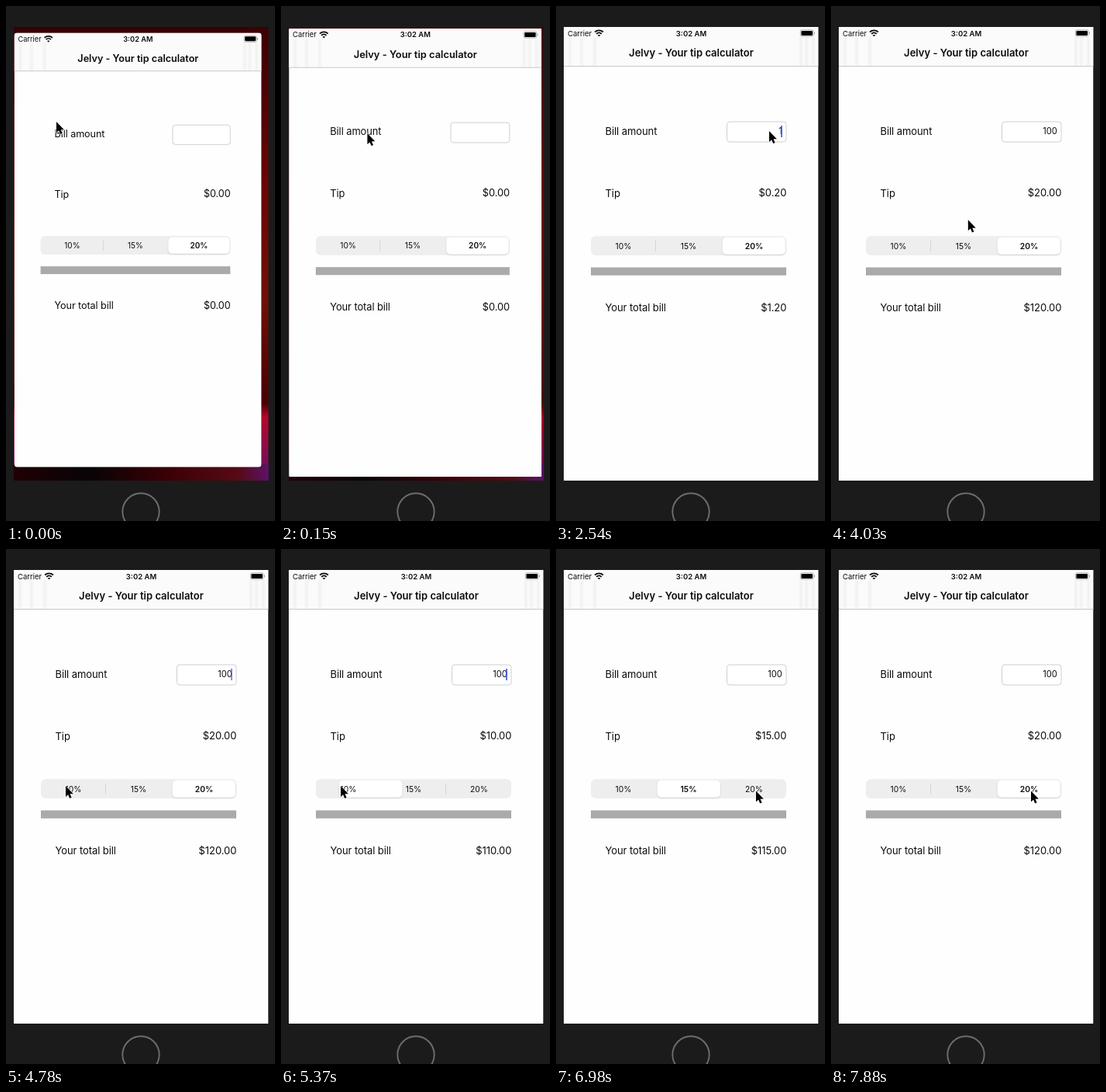
Animation of 347 by 663 pixels, one loop 8000 ms. Source, as an HTML page:

```html
<!DOCTYPE html>
<html lang="en">
<head>
<meta charset="utf-8">
<title>Tip calculator</title>
<style>
  html, body { margin: 0; width: 100%; height: 100%; overflow: hidden; background: #1b1b1b; }
  svg { display: block; width: 100vw; height: 100vh; }
  text { font: 13px Inter, "Liberation Sans", sans-serif; letter-spacing: -.08px; fill: #0c0c0c; }
  .title { font-weight: 600; letter-spacing: 0; }
  .status { font-size: 9.5px; letter-spacing: 0; }
  .seg text { font-size: 10.3px; letter-spacing: 0; text-anchor: middle; }
  .end { text-anchor: end; }
  .mid { text-anchor: middle; }
  #bill { font-size: 11.1px; letter-spacing: 0; }
</style>
</head>
<body>
<svg viewBox="0 0 347 663">
  <defs>
    <linearGradient id="side" x2="0" y2="1">
      <stop offset="0" stop-color="#3c0004"/>
      <stop offset=".35" stop-color="#6a0606"/>
      <stop offset=".6" stop-color="#6e1204"/>
      <stop offset=".83" stop-color="#4a0006"/>
      <stop offset=".86" stop-color="#b4082a"/>
      <stop offset="1" stop-color="#5c1266"/>
    </linearGradient>
    <linearGradient id="floor">
      <stop offset="0" stop-color="#200004"/>
      <stop offset=".3" stop-color="#080406"/>
      <stop offset=".6" stop-color="#3a0006"/>
      <stop offset=".88" stop-color="#560a14"/>
      <stop offset="1" stop-color="#5c1266"/>
    </linearGradient>
    <filter id="soft"><feGaussianBlur stdDeviation=".9"/></filter>
    <filter id="lift" x="-10%" y="-20%" width="120%" height="150%">
      <feDropShadow dx="0" dy="1" stdDeviation="1.2" flood-opacity=".16"/>
    </filter>
    <clipPath id="window"><rect id="mask" x="10" y="27" width="328.5"/></clipPath>
  </defs>

  <rect width="347" height="663" fill="#1b1b1b"/>
  <circle cx="174" cy="651" r="23.7" fill="none" stroke="#6c6c6c" stroke-width="2"/>

  <g id="home">
    <rect x="10" y="27" width="328.5" height="584" fill="url(#side)"/>
    <rect x="10" y="27" width="300" height="8" fill="#360004"/>
    <rect x="10" y="590" width="328.5" height="21" fill="url(#floor)"/>
  </g>

  <g id="app"><g clip-path="url(#window)">
    <rect x="10" y="27" width="328.5" height="584" fill="#fefefe"/>
    <rect x="10" y="27" width="328.5" height="50.5" fill="#fbfbfb"/>
    <path d="M18 40V77M33 40V77M50 40V77M316 40V77M323 40V77M332 40V77"
      stroke="#f2f2f2" stroke-width="4" filter="url(#soft)"/>
    <path d="M10 77.5H338.5" stroke="#c9c9c9"/>

    <text class="status" x="15" y="38.5">Carrier</text>
    <g fill="none" stroke="#0c0c0c" stroke-width="1.8">
      <path d="M50.1 33.5a7.8 7.8 0 0 1 10.8 0M52.2 35.8a4.7 4.7 0 0 1 6.6 0"/>
      <path d="M54.2 37.6h2.6l-1.3 1.4z" stroke-width=".8" fill="#0c0c0c"/>
    </g>
    <text class="status title mid" x="174.5" y="38.5">3:02 AM</text>
    <rect x="315.2" y="30.7" width="17" height="8.4" rx="2.2" fill="none" stroke="#999" stroke-width=".7"/>
    <rect x="316.4" y="31.9" width="14.6" height="6" rx="1.2"/>
    <path d="M333.3 33.6v2.6" stroke="#999"/>

    <text class="title mid" x="174.5" y="65">Jelvy - Your tip calculator</text>
    <text x="63.5" y="165.5">Bill amount</text>
    <rect x="220.5" y="149" width="76.5" height="26" rx="3.5" fill="#fff" stroke="#cecece"/>
    <text id="bill" class="end" x="291.7" y="165.2"></text>
    <rect id="caret" x="290.2" y="154" width="1.6" height="15" fill="#3450f0"/>

    <text x="63.5" y="245.5">Tip</text>
    <text id="tip" class="end" x="297.3" y="245"></text>

    <g class="seg">
      <rect x="45" y="296.3" width="252" height="24.7" rx="6" fill="#eeeeef"/>
      <path class="bar" d="M128.5 302v14" stroke="#d4d4d6"/>
      <path class="bar" d="M212.5 302v14" stroke="#d4d4d6"/>
      <rect id="thumb" y="297.7" width="81" height="22" rx="5" fill="#fff" filter="url(#lift)"/>
      <text x="87" y="312.6">10%</text>
      <text x="171" y="312.6">15%</text>
      <text x="255.5" y="312.6">20%</text>
    </g>
    <rect x="45" y="336.5" width="252" height="10.3" fill="#aaa"/>

    <text x="63.5" y="393.3">Your total bill</text>
    <text id="total" class="end" x="297.3" y="393.3"></text>
  </g></g>

  <path id="cursor" d="M0 0v14l3.1-2.8 2.1 4.9 2.4-1-2.1-4.8h4.4z"
    stroke="#fff" stroke-width="1.1" paint-order="stroke"/>
</svg>

<script>
const LOOP = 8000, TICK = 148.5;   // the screen refreshes once per tick
const $ = id => document.getElementById(id);
const bars = document.querySelectorAll('.bar');
const labels = document.querySelectorAll('.seg text');

const moves = [
  { from: 0, to: 750, x: 251, y: 180 },
  { from: 750, to: 1180, x: 275, y: 161 },
  { from: 3600, to: 4600, x: 77, y: 305 },
  { from: 5500, to: 6230, x: 165, y: 311 },
  { from: 6540, to: 6980, x: 258, y: 311.5 }
];
const keys = [2520, 2960, 3110];          // typing "100"
const caretStarts = [1180, 2520, 2970];
const taps = [{ at: 5080, pick: 0 }, { at: 6410, pick: 1 }, { at: 7440, pick: 2 }];

const clamp = v => Math.min(1, Math.max(0, v));
const smooth = k => k * k * (3 - 2 * k);
const easeOut = (k, power) => 1 - (1 - k) ** power;
const money = v => '$' + v.toFixed(2);

// The pointer swings: its height settles sooner than its x
function pointer(t) {
  let x = 65, y = 149;
  for (const m of moves) {
    const k = clamp((t - m.from) / (m.to - m.from));
    x += (m.x - x) * easeOut(k, 1.3);
    y += (m.y - y) * easeOut(k, 3);
  }
  return [x, y];
}

function segment(t) {
  let pick = 2, pos = 2;
  for (const tap of taps) {
    if (t < tap.at) break;
    pick = tap.pick;
    pos += (pick - pos) * smooth(clamp((t - tap.at) / 360));
  }
  return { pick, pos };
}

function caret(t) {
  const begin = caretStarts.filter(s => s <= t).pop();
  if (!begin) return 0;
  const p = t - begin - 750;
  return p < 0 ? 1 : clamp(Math.max(1 - p % 1000 / 150, (p % 1000 - 380) / 120));
}

function draw(t) {
  const fade = Math.exp(-t / 115), z = fade < .03 ? 0 : fade;
  $('home').style.display = z ? '' : 'none';
  $('app').setAttribute('transform', `translate(${.9 * z} ${8.4 * z}) scale(${1 - .029 * z})`);
  $('mask').setAttribute('height', 584 - 8.5 * z);
  $('mask').setAttribute('rx', 4 * z);

  const { pick, pos } = segment(t);
  const typed = '100'.slice(0, keys.filter(k => k <= t).length);
  const bill = Number(typed), tip = bill * (10 + 5 * pick) / 100;
  $('bill').textContent = typed;
  $('tip').textContent = money(tip);
  $('total').textContent = money(bill + tip);

  $('thumb').setAttribute('x', 46.7 + 84.1 * pos);
  labels.forEach((el, i) => el.style.fontWeight = Math.abs(pos - i) < .03 ? 600 : 400);
  bars.forEach((el, i) => el.style.display = pick === i || pick === i + 1 ? 'none' : '');

  $('caret').setAttribute('opacity', caret(t));
  $('cursor').setAttribute('transform', `translate(${pointer(t)})`);
}

const start = performance.now();
function frame() {
  const t = (performance.now() - start) % LOOP;
  draw(Math.floor(t / TICK) * TICK);
  requestAnimationFrame(frame);
}
frame();
</script>
</body>
</html>
```
